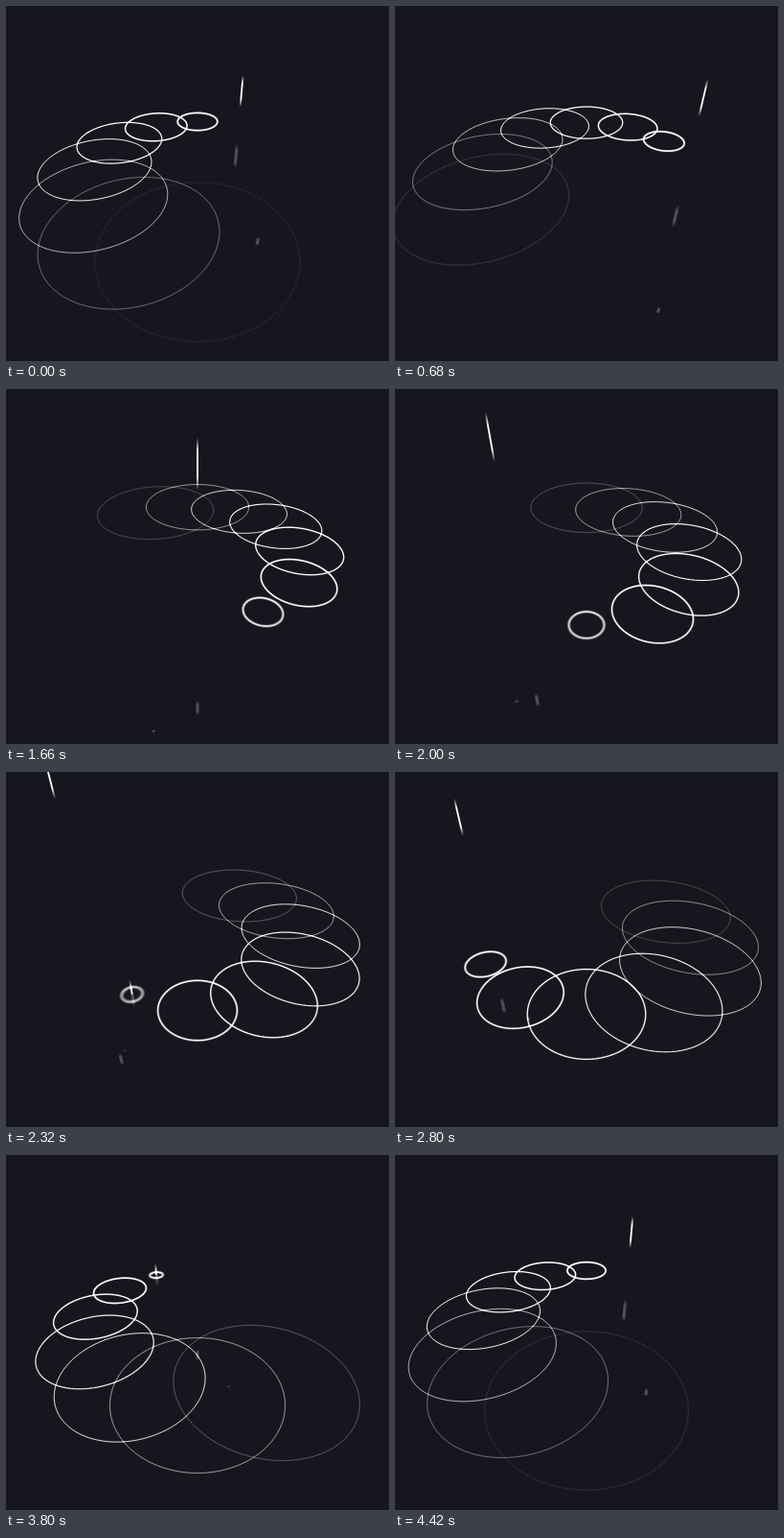
An HTML page with a canvas for the animation above (4.44 s loop, 400 by 370 pixels).

```html
<!DOCTYPE html>
<html lang="en">
<head>
<meta charset="utf-8">
<title>Ring of drops</title>
<style>
  html, body { margin: 0; width: 100%; height: 100%; overflow: hidden; background: #17161f; }
  canvas { display: block; width: 400px; height: 370px; }
</style>
</head>
<body>
<canvas id="stage" width="400" height="370"></canvas>
<script>
const ctx = document.getElementById('stage').getContext('2d');

const LOOP = 4440, FRAME = 20, SAMPLES = 8;
const DROPS = 12, GAP = LOOP / DROPS, RADIUS = 105.4;
const FALL = 778, TRAIL = 60, LIFE = 2590;
const FOCAL = 320.4, LIFT = 18.8, SIN = 0.6, COS = 0.8;

// Perspective view of the water plane; h is the height above it.
function project(x, z, h) {
  const k = FOCAL / (FOCAL + COS * z - SIN * h);
  return [200 + x * k, 185 - (LIFT + SIN * z + COS * h) * k];
}

// Height of a drop a given time before its impact.
function height(before) {
  const b = Math.min(before, FALL);
  return Math.max(0, 0.545 * b - 0.00035 * b * b - 5.5);
}

function line(x, z, h1, h2, width, alpha) {
  ctx.lineWidth = width;
  ctx.globalAlpha = alpha / SAMPLES;
  ctx.beginPath();
  ctx.moveTo(...project(x, z, h1));
  ctx.lineTo(...project(x, z, h2));
  ctx.stroke();
}

function ring(x, z, age) {
  const r = Math.sqrt(2.3 * age), steps = 90;
  ctx.lineWidth = 2 * (1 - age / LIFE);
  ctx.globalAlpha = 1 / SAMPLES;
  ctx.beginPath();
  for (let i = 0; i < steps; i++) {
    const a = i / steps * 2 * Math.PI;
    ctx.lineTo(...project(x + r * Math.sin(a), z + r * Math.cos(a), 0));
  }
  ctx.closePath();
  ctx.stroke();
}

function drawScene(t) {
  for (let i = 0; i < DROPS; i++) {
    const a = i / DROPS * 2 * Math.PI;
    const x = RADIUS * Math.sin(a), z = RADIUS * Math.cos(a);
    const since = t - i * GAP + 300 + FALL;
    const age = (since % LOOP + LOOP) % LOOP - FALL;

    const low = height(-age), high = height(TRAIL - age);
    if (high > low) {
      line(x, z, -low, -high, 3, 0.25);
      line(x, z, low, high, 1.8, 1);
    }
    if (age > 0 && age < LIFE) ring(x, z, age);
  }
}

function render(t) {
  ctx.globalCompositeOperation = 'source-over';
  ctx.globalAlpha = 1;
  ctx.fillStyle = '#17161f';
  ctx.fillRect(0, 0, 400, 370);

  // Motion blur: add up several moments; stroke colour is white minus background.
  ctx.globalCompositeOperation = 'lighter';
  ctx.strokeStyle = '#e8e9e0';
  for (let s = 0; s < SAMPLES; s++) {
    drawScene(t + ((s + 0.5) / SAMPLES - 0.5) * FRAME);
  }
}

let start;
function tick(now) {
  if (start === undefined) start = now;
  const t = Math.max(0, now - start) % LOOP;
  render(Math.floor(t / FRAME) * FRAME);
  requestAnimationFrame(tick);
}
render(0);
requestAnimationFrame(tick);
</script>
</body>
</html>
```
